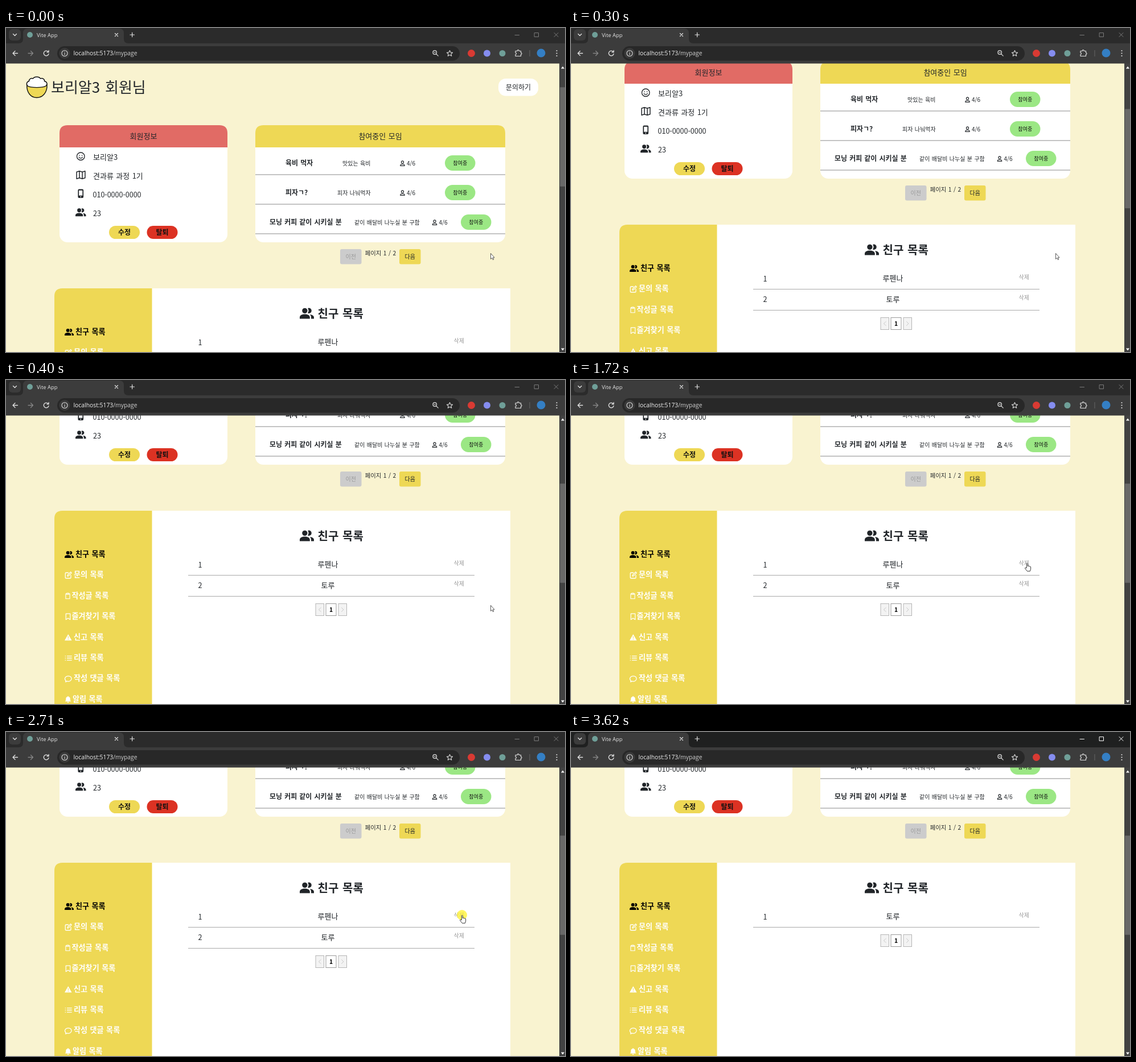
An HTML page that plays this animation: 982x570 px, repeating every 4.22 s.

```html
<!DOCTYPE html>
<html lang="ko">
<head>
<meta charset="utf-8">
<title>Vite App</title>
<style>
  html, body { margin: 0; width: 100%; height: 100%; overflow: hidden; background: #f9f3d0; }
  svg { display: block; width: 982px; height: 570px; }
  text { font-family: "Noto Sans CJK KR", "Noto Sans CJK", "Noto Sans CJK JP", sans-serif; word-spacing: .06em; }
  text.ui { font-family: "Open Sans", "Noto Sans", sans-serif; word-spacing: 0; }
  .line { fill: none; stroke: currentColor; stroke-linecap: round; stroke-linejoin: round; }
</style>
</head>
<body>
<svg id="stage" viewBox="0 0 982 570" xmlns="http://www.w3.org/2000/svg"></svg>
<script>
const LOOP = 4220;
const YELLOW = '#eed855', INK = '#212529', BAR = '#3c3c3c';

const rect = (x, y, w, h, fill, r = 0, extra = '') =>
  `<rect x="${x}" y="${y}" width="${w}" height="${h}" rx="${r}" fill="${fill}" ${extra}/>`;
const disc = (x, y, r, fill) => `<circle cx="${x}" cy="${y}" r="${r}" fill="${fill}"/>`;
const path = (d, fill) => `<path d="${d}" fill="${fill}"/>`;
const stroke = (d, color, width = 1.3) =>
  `<path class="line" d="${d}" color="${color}" stroke-width="${width}"/>`;
const rule = (x1, x2, y, color) => rect(x1, y, x2 - x1, 1, color);

// cy is the optical middle of the glyphs
const label = (x, cy, size, str, { bold = 400, color = INK, anchor = 'start', cls = '' } = {}) =>
  `<text class="${cls}" x="${x}" y="${(cy + size * .365).toFixed(2)}" font-size="${size}"
    font-weight="${bold}" fill="${color}" text-anchor="${anchor}">${str}</text>`;
const mid = (x, cy, size, str, bold = 400, color = INK) =>
  label(x, cy, size, str, { bold, color, anchor: 'middle' });

// Icons on a 16 unit grid: s = stroked, f = filled
const ICONS = {
  people: { f: 'M8.7 5a3 3 0 1 1-6 0a3 3 0 1 1 6 0zM0 14v-1.4C0 10 3 9 5.7 9s5.7 1 5.7 3.6V14z' +
               'M9 2.3a3 3 0 1 1 0 5.4a4.6 4.6 0 0 0 0-5.4zM11.4 9.2c2.3.2 4.6 1.2 4.6 3.4V14h-3.2v-1.5c0-1.4-.6-2.5-1.4-3.3z' },
  smile: { s: 'M15 8A7 7 0 1 1 1 8a7 7 0 1 1 14 0zM4.8 9.6c1.4 2.6 5 2.6 6.4 0M5.6 6v.6M10.4 6v.6' },
  map: { s: 'M1 3l4.6-1.4L10.4 3 15 1.6V13l-4.6 1.4L5.6 13 1 14.4zM5.6 1.6V13M10.4 3v11.4' },
  phone: { f: 'M5 0h6a2 2 0 0 1 2 2v12a2 2 0 0 1-2 2H5a2 2 0 0 1-2-2V2a2 2 0 0 1 2-2zM4.8 2.4v9.2h6.4V2.4zM8 13a.9.9 0 1 0 0 1.8a.9.9 0 1 0 0-1.8z' },
  person: { s: 'M11 5a3 3 0 1 1-6 0a3 3 0 1 1 6 0zM2.5 14.3c0-5.4 11-5.4 11 0z' },
  pencil: { s: 'M8 2.5H3A1.5 1.5 0 0 0 1.5 4v9A1.5 1.5 0 0 0 3 14.5h9a1.5 1.5 0 0 0 1.5-1.5V8M6 10l.6-2.6L13 1l2 2-6.4 6.4z' },
  clipboard: { s: 'M5 2.5H2.8V15h10.4V2.5H11M5.3 1h5.4v3H5.3z' },
  bookmark: { s: 'M3 1h10v14l-5-3.6L3 15z' },
  warning: { f: 'M8 1l8 14H0zM7.2 5.5l.3 5h1l.3-5zM7.2 11.8v1.6h1.6v-1.6z' },
  list: { s: 'M5.5 3.5H15M5.5 8H15M5.5 12.5H15M1.5 3.5h.4M1.5 8h.4M1.5 12.5h.4' },
  chat: { s: 'M2.7 12C-2 7.500 2 2 8 2s8.500 5 5.500 9c-2 2.600-5.500 3-8 2.200L2 14.600z' },
  bell: { f: 'M8 0a1 1 0 0 1 1 1.200c2.300.500 4 2.500 4 4.800 0 4 1 5.500 2 6.500H1c1-1 2-2.500 2-6.500 0-2.300 1.700-4.300 4-4.800A1 1 0 0 1 8 0zM6 13.500h4a2 2 0 0 1-4 0z' },
};
const icon = (name, x, y, size, color, width = 1.4) => {
  const { f, s } = ICONS[name];
  const shape = f ? `<path d="${f}" fill="${color}" fill-rule="evenodd"/>` : stroke(s, color, width);
  return `<g transform="translate(${x} ${y}) scale(${size / 16})">${shape}</g>`;
};

const pill = (x, y, w, h, fill, str, size, bold) =>
  rect(x, y, w, h, fill, h / 2) + mid(x + w / 2, y + h / 2, size, str, bold, '#111');

const card = (x, w, fill, title) =>
  rect(x, 171, w, 206, '#fff', 14) +
  path(`M${x} 210v-25q0-14 14-14h${w - 28}q14 0 14 14v25z`, fill) +
  mid(x + w / 2, 190.5, 13, title, 500);

const bowl = () =>
  path('M36.700 100C36 114 44 122.500 54 122.500S72.700 114 72 100z', YELLOW) +
  stroke('M36.700 100C36 114 44 122.500 54 122.500S72.700 114 72 100', '#111', 1.4) +
  path('M38 102c-3.500-3-1-8 2.500-8.500 0-4 4-6 7-4.500 2.500-4 10.500-4 13 0 3.500-1.500 7.500 1 7 4.500 4 .5 6.500 5.500 2.500 8.500-5 3.500-27 3.500-32 0z', '#fff') +
  stroke('M38 102c-3.500-3-1-8 2.500-8.500 0-4 4-6 7-4.500 2.500-4 10.500-4 13 0 3.500-1.500 7.500 1 7 4.500 4 .5 6.500 5.500 2.500 8.500-5 3.500-27 3.500-32 0z', '#111', 1.4);

const profile = () => card(94, 295, '#e16b65', '회원정보') +
  icon('smile', 123.5, 218, 15.5, INK) + label(153, 227, 13, '보리알3') +
  icon('map', 123, 250, 17, INK) + label(153, 260, 13, '견과류 과정 1기') +
  icon('phone', 123.500, 283.500, 15.500, INK) + label(152.500, 293.500, 12.500, '010-0000-0000') +
  icon('people', 122, 315, 18.500, INK) + label(153, 326.500, 12.500, '23') +
  pill(181, 348, 54, 23, YELLOW, '수정', 12, 700) +
  pill(247.500, 348, 54, 23, '#dc3223', '탈퇴', 12, 700);

const meeting = (cy, titleX, title, noteX, note, userX, pillX) =>
  label(titleX, cy, 12, title, { bold: 700 }) +
  label(noteX, cy, 10, note) +
  icon('person', userX - 1, cy - 5.5, 11, INK, 1.6) + label(userX + 12, cy, 10, '4/6') +
  pill(pillX, cy - 14, 53.5, 27, '#9be784', '참여중', 9, 500) +
  rule(438, 877, cy + 19.500, '#8a8a8a');

const meetings = () => card(438, 439, YELLOW, '참여중인 모임') +
  meeting(238, 491, '육비 먹자', 591, '맛있는 육비', 692, 771) +
  meeting(290, 491, '피자ㄱ?', 582, '피자 나눠먹자', 692, 771) +
  meeting(342, 463, '모닝 커피 같이 시키실 분', 612, '같이 배달비 나누실 분 구함', 748.5, 799) +
  rect(587, 389, 37.5, 26.5, '#ccc', 3) + mid(605.7, 402, 10, '이전', 400, '#999') +
  mid(658, 396, 10.3, '페이지 1 / 2') +
  rect(691, 389, 37.500, 26.500, YELLOW, 3) + mid(709.700, 402, 10, '다음');

const MENU = [
  ['people', 16, '친구 목록', 122], ['pencil', 13, '문의 목록', 119],
  ['clipboard', 11, '작성글 목록', 115.5], ['bookmark', 12, '즐겨찾기 목록', 115.5],
  ['warning', 12.5, '신고 목록', 119], ['list', 13, '리뷰 목록', 119],
  ['chat', 13, '작성 댓글 목록', 119], ['bell', 12, '알림 목록', 117],
];
const menu = () => MENU.map(([name, size, str, x], i) => {
  const cy = 534 + i * 36.45, color = i ? '#fff' : '#000';
  return icon(name, 103, cy + 1 - size / 2, size, color, 1.6) + label(x, cy, 13.1, str, { bold: 700, color });
}).join('');

const friends = names => {
  const rows = names.map((name, i) => {
    const y = 553 + i * 36.7;
    return label(337.500, y, 12.500, i + 1) + mid(565.500, y - .5, 13, name) +
      label(786.500, y - 3, 10, '삭제', { color: '#999' }) + rule(320, 823, Math.round(y + 18), '#a9a9a9');
  }).join('');
  const top = 547.500 + names.length * 37;
  const box = (x, w, fill, color) => rect(x, top, w, 21, fill, 0, `stroke="${color}"`);
  return rows + box(544, 14.5, '#f3f3f3', '#b5b5b5') + box(562, 18, '#fff', '#9a9a9a') + box(584, 14.500, '#f3f3f3', '#b5b5b5') +
    stroke(`M553 ${top + 7}l-3.500 3.500 3.500 3.500M589.500 ${top + 7}l3.500 3.500-3.500 3.500`, '#c8c8c8', 1) +
    mid(571, top + 10.500, 10.5, '1', 700, '#000');
};

const page = () =>
  bowl() + label(79, 105, 26, '보리알3 회원님') +
  rect(865, 89, 70, 30.5, '#fff', 13) + mid(900, 104.5, 12, '문의하기', 500) +
  profile() + meetings() +
  path('M85 860V472q0-14 14-14H257v402z', YELLOW) + rect(256.5, 458, 629.5, 402, '#fff') +
  menu() + icon('people', 516, 489.500, 25, INK) +
  label(547.500, 503, 20, '친구 목록', { bold: 700 }) +
  `<g id="two">${friends(['루펜나', '토루'])}</g><g id="one">${friends(['토루'])}</g>`;

const scrollbar = () => rect(972, 62, 10, 508, '#424242') +
  rect(973, 0, 9, 174.5, '#686868', 0, 'id="thumb"') +
  path('M975 71.500l3-4 3 4z', '#fff') + path('M975 563.500l3 4 3-4z', '#fff');

const browser = () => rect(0, 0, 982, 28, '#2b2b2b', 0, 'id="frame"') +
  rect(5, 2, 21, 20, BAR, 6) + stroke('M12.500 10.500l3 3 3-3', '#e3e3e3') +
  path('M22 27q8 0 8-8V9q0-8 8-8H199q8 0 8 8V19q0 8 8 8z', BAR) + rect(0, 27, 982, 35.5, BAR) +
  disc(42, 12, 5, '#6f9f98') + label(54, 13, 9.4, 'Vite App', { color: '#e3e3e3', cls: 'ui' }) +
  stroke('M191.500 9.500l5 5m0-5l-5 5', '#e3e3e3', 1.2) + stroke('M218 12h7.500M221.700 8.200v7.500', '#e3e3e3', 1.2) +
  '<g id="controls">' + stroke('M894 12.500h7.500M928.500 8.500h7v7h-7zM963 8.500l7 7m0-7l-7 7', 'inherit', 1) + '</g>' +
  stroke('M20.500 44.500h-8.500m4-4l-4 4 4 4', '#dedede') + stroke('M39 44.500h8.500m-4-4l4 4-4 4', '#858585') +
  stroke('M74 41.500a4.400 4.400 0 1 0 1 4M75 39.500v3h-3', '#dedede') +
  rect(90, 32, 707, 25.5, '#282828', 12.7) + disc(103, 44.500, 9.500, '#3a3a3a') +
  stroke('M108 44.500a5 5 0 1 1-10 0a5 5 0 1 1 10 0zM103 44v3M103 41.900v.1', '#dedede', 1.1) +
  label(118.500, 44.500, 10.35, 'localhost:5173<tspan fill="#d0d0d0">/mypage</tspan>', { color: '#f1f1f1', cls: 'ui' }) +
  stroke('M756.500 43a3.300 3.300 0 1 1-6.600 0a3.300 3.300 0 1 1 6.600 0zM755.700 45.700l3.500 3.500M751.800 43h2.800', '#dedede', 1.2) +
  stroke('M779.500 39.500l1.500 3.400 3.600.4-2.700 2.400.8 3.600-3.200-1.900-3.200 1.900.8-3.600-2.700-2.400 3.600-.4z', '#dedede', 1.1) +
  disc(817.500, 44.500, 6.500, '#d93a33') + disc(845, 44.500, 6, '#858df0') + disc(872, 44.500, 5.500, '#6f9f98') +
  stroke('M895 40.500h3.200c0-2.500 3-2.500 3 0h3.300v3c2 0 2 2.800 0 2.800v3.200H895v-3c2 0 2-3 0-3z', '#dedede', 1.2) +
  rect(919.500, 39, 1, 11, '#666') + disc(940, 44, 7.5, '#347fc4') +
  [40, 44.500, 49].map(y => disc(967.500, y, 1.1, '#dedede')).join('');

const pointers = () =>
  `<g id="arrow"><path d="M.5.500v10l2.300-2 1.500 3.300 1.500-.7-1.400-3.200h2.700z" fill="#fff" stroke="#333" stroke-width=".8"/></g>
   <g id="hand"><path d="M3.300 9V1.600c0-1.400 2-1.400 2 0v4c.3-.8 1.700-.7 1.800.2.400-.7 1.700-.5 1.800.5.500-.5 1.700-.3 1.700.8v3.700l-1.200 3.500H4.400L.8 9.800C0 8.500 1.200 7.700 2.100 8.300z" fill="#fff" stroke="#222" stroke-width=".9"/></g>`;

const stage = document.getElementById('stage');
stage.innerHTML = rect(0, 0, 982, 570, '#f9f3d0') + `<g id="page">${page()}</g>` +
  scrollbar() + browser() +
  '<circle id="click" cx="801" cy="322" r="9" fill="#fff12e" opacity=".75"/>' + pointers();
const el = Object.fromEntries([...stage.querySelectorAll('[id]')].map(n => [n.id, n]));

// [start ms, value...]
const SCROLL = [[0, 0], [200, 19], [300, 112], [400, 228]];
const POINTER = [
  [0, 'arrow', 851, 396], [600, 'arrow', 849, 393], [700, 'arrow', 842, 380], [800, 'arrow', 831, 360],
  [900, 'arrow', 820, 342], [990, 'arrow', 813, 331], [1090, 'arrow', 810, 327], [1210, 'arrow', 808, 326],
  [1300, 'arrow', 805, 325], [1400, 'hand', 798, 323], [1500, 'hand', 797, 322.5], [1720, 'hand', 797, 322],
  [3420, 'arrow', 817, 358], [3520, 'arrow', 845, 433], [3620, 'none', 0, 0],
];
const CLICK = [[0, false], [2710, true], [2910, false]];
const ACTIVE = [[0, false], [2810, true]];
const DELETED = [[0, false], [2910, true]];

const at = (table, t) => table.findLast(([start]) => start <= t).slice(1);
const show = (node, on) => node.setAttribute('visibility', on ? 'visible' : 'hidden');

function draw(t) {
  const [scroll] = at(SCROLL, t), [kind, x, y] = at(POINTER, t);
  const [click] = at(CLICK, t), [active] = at(ACTIVE, t), [deleted] = at(DELETED, t);
  el.page.setAttribute('transform', `translate(0 ${-scroll})`);
  el.thumb.setAttribute('y', 104.3 + scroll * .342);
  for (const name of ['arrow', 'hand']) {
    show(el[name], name === kind);
    el[name].setAttribute('transform', `translate(${x} ${y})`);
  }
  show(el.click, click);
  show(el.two, !deleted);
  show(el.one, deleted);
  el.frame.setAttribute('fill', active ? '#1f2020' : '#2b2b2b');
  el.controls.setAttribute('color', active ? '#fff' : '#7b7b7b');
}

const begin = performance.now();
function tick() {
  draw((performance.now() - begin) % LOOP);
  requestAnimationFrame(tick);
}
tick();
</script>
</body>
</html>
```
